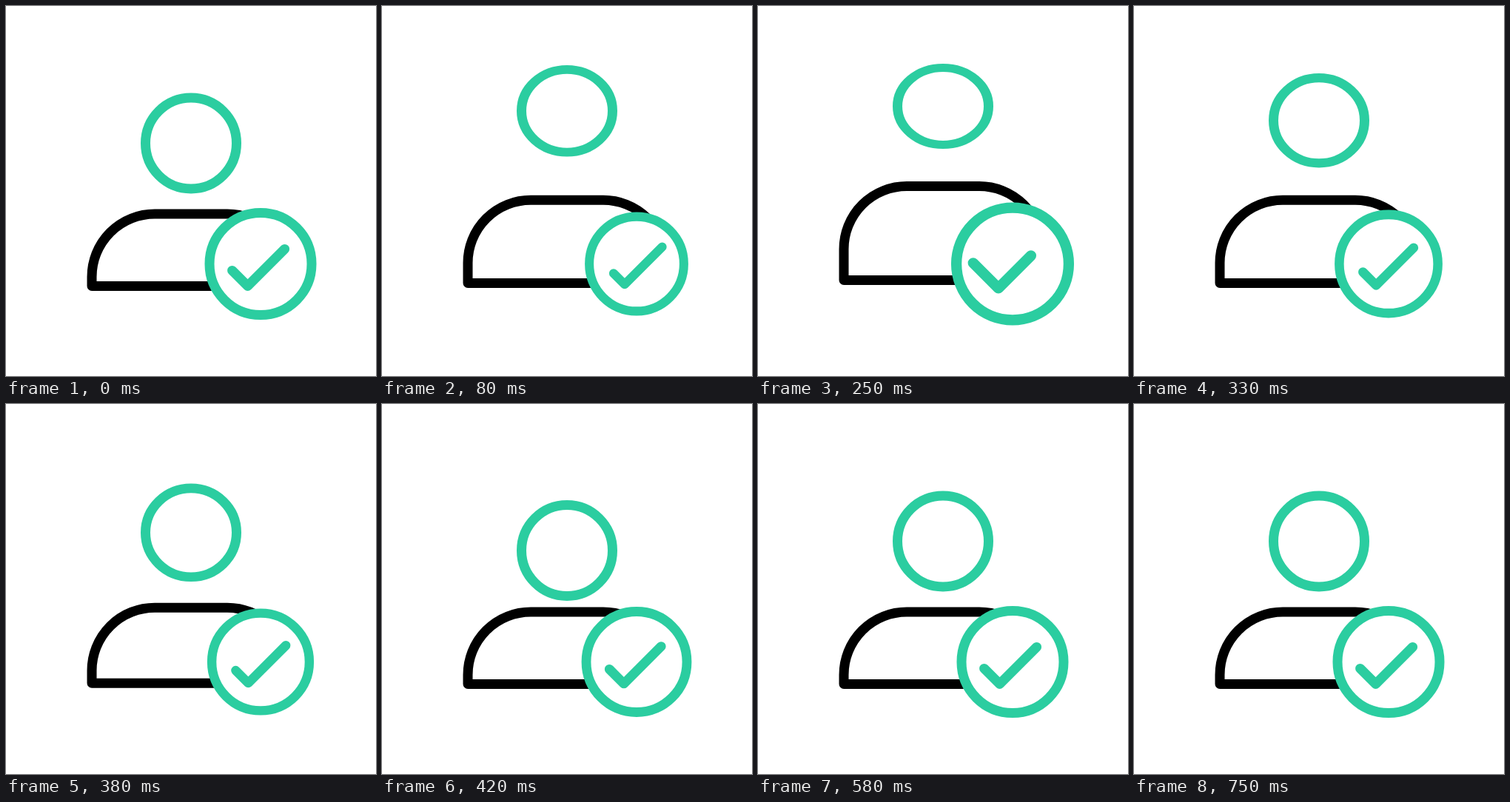
Animation, 500 px wide and 500 px high, one loop 790 ms. Source, as an HTML page with a canvas:

```html
<!DOCTYPE html>
<html lang="en">
<head>
<meta charset="utf-8">
<title>Verified user</title>
<style>
  html, body { margin: 0; width: 100%; height: 100%; overflow: hidden; background: #fff; }
  canvas { display: block; width: 500px; height: 500px; }
</style>
</head>
<body>
<canvas id="stage" width="500" height="500"></canvas>
<script>
const ctx = document.getElementById('stage').getContext('2d');
const GREEN = '#2bcda0';
const LOOP = 790;
const FPS = 24;
const STROKE = 13;

const smooth = t => t * t * (3 - 2 * t);
const easeIn = power => t => t ** power;
const easeOut = power => t => 1 - (1 - t) ** power;

// Eased progress from 0 to 1 between two steps.
const ramp = (step, from, to, ease = smooth) =>
  ease(Math.min(1, Math.max(0, (step - from) / (to - from))));

// Rises over steps 0 to 4, holds, and falls over steps 6 to 10.
const jump = (step, ease) => ramp(step, 0, 4, ease) - ramp(step, 6, 10, ease);

const headY = step => 185.5
  - 50 * ramp(step, 0, 4, easeOut(3))
  + 62.5 * ramp(step, 6, 10, easeIn(1.7))
  - 12.5 * ramp(step, 10, 14);

// Turning points of the badge's wobble: [step, growth].
const SWINGS = [[0, 0], [3, -0.1], [6, 0.1], [8.5, -0.05], [12, 0.04], [14, 0], [16, -0.01], [18, 0]];

function wobble(step) {
  return SWINGS.slice(1).reduce((sum, [to, growth], i) => {
    const [from, before] = SWINGS[i];
    return sum + (growth - before) * ramp(step, from, to);
  }, 0);
}

// Steps begin on whole hundredths of a second.
function stepAt(ms) {
  let step = 0;
  while (Math.round((step + 1) * 100 / FPS) * 10 <= ms) step++;
  return step;
}

function drawRing(x, y, radius, scaleX, scaleY, drawInside) {
  ctx.save();
  ctx.translate(x, y);
  ctx.scale(scaleX, scaleY);
  ctx.strokeStyle = GREEN;
  ctx.beginPath();
  ctx.arc(0, 0, radius, 0, Math.PI * 2);
  ctx.fill();
  ctx.stroke();
  if (drawInside) drawInside();
  ctx.restore();
}

function drawBody(stretch) {
  const left = 116, right = 384, radius = 85;
  const top = 281 - 37.5 * stretch;
  const bottom = 378.5 - 8 * stretch;
  ctx.strokeStyle = '#000';
  ctx.beginPath();
  ctx.moveTo(left, bottom);
  ctx.arc(left + radius, top + radius, radius, Math.PI, Math.PI * 1.5);
  ctx.arc(right - radius, top + radius, radius, Math.PI * 1.5, Math.PI * 2);
  ctx.lineTo(right, bottom);
  ctx.closePath();
  ctx.stroke();
}

// The tick slides along its own path as the badge grows.
function drawTick(growth) {
  const x = -17.4, y = 29.9;
  const slide = -80 * growth - 200 * growth ** 2;
  const short = 21 - slide, long = 50 + slide;
  ctx.beginPath();
  ctx.moveTo(x - short, y - short);
  ctx.lineTo(x, y);
  ctx.lineTo(x + long, y - long);
  ctx.stroke();
}

function draw(step) {
  ctx.fillStyle = '#fff';
  ctx.fillRect(0, 0, 500, 500);
  ctx.lineWidth = STROKE;
  ctx.lineCap = ctx.lineJoin = 'round';
  drawBody(jump(step, smooth));
  drawRing(250, headY(step), 61.5, 1, 1 - 0.155 * jump(step, easeOut(1.3)));
  const growth = wobble(step);
  drawRing(344, 348.5, 69, 1 + growth, 1 + growth, () => drawTick(growth));
}

const start = performance.now();
function tick() {
  draw(stepAt((performance.now() - start) % LOOP));
  requestAnimationFrame(tick);
}
tick();
</script>
</body>
</html>
```
